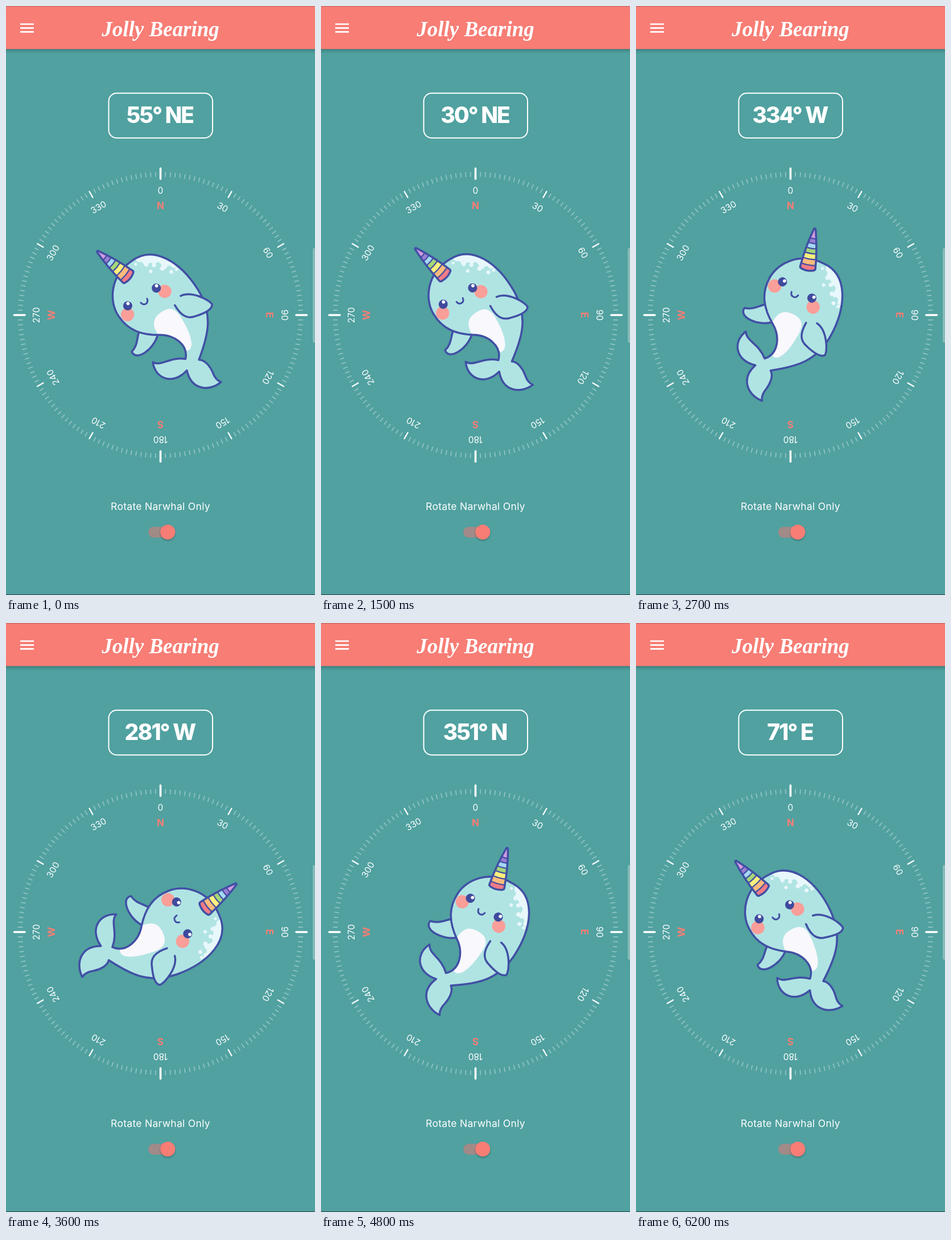
These frames come from a looping animation (543x1032 px, 6.3 s). An HTML page:

```html
<!DOCTYPE html>
<html lang="en">
<head>
<meta charset="utf-8">
<title>Jolly Bearing</title>
<style>
  html, body { margin: 0; width: 100%; height: 100%; overflow: hidden; background: #50a1a0; }
  svg { display: block; width: 543px; height: 1032px; }
  text { font-family: Inter, "Open Sans", sans-serif; fill: #fff; text-anchor: middle; }
  .title { font: italic bold 37px "Liberation Serif", "Noto Serif", serif; }
  .heading { font-size: 39px; font-weight: 800; letter-spacing: -2px; }
  .caption { font-size: 17.5px; letter-spacing: .3px; }
  .degree { font-size: 15.5px; }
  .cardinal { font-size: 17px; font-weight: 700; fill: #f77d75; }
  .line { fill: none; stroke: #414fa4; stroke-width: 3.5; stroke-linecap: round; stroke-linejoin: round; }
  .skin { fill: #b0e4e3; }
  .ink { fill: #3f4a9e; }
  .blush { fill: #f99e98; }
  .frost { fill: #e8f7fb; }
</style>
</head>
<body>
<svg viewBox="0 0 543 1032">
  <defs>
    <linearGradient id="shade" x2="0" y2="1">
      <stop offset="0" stop-color="#1c5555" stop-opacity=".55"/>
      <stop offset=".4" stop-color="#1c5555" stop-opacity=".2"/>
      <stop offset="1" stop-color="#1c5555" stop-opacity="0"/>
    </linearGradient>
    <filter id="lift" x="-30%" y="-30%" width="160%" height="160%">
      <feDropShadow dx="0" dy="1.5" stdDeviation="1.5" flood-opacity=".35"/>
    </filter>
    <path id="body" d="M283 434.5C328 432.5 352 482 351 540C349.5 593 322 617 285 644
      C294 650 295 665 293 676C290 688 293 694 296 698C270 701 244 682 257 648
      C222 657 202 630 215 603C222 618 245 611 266 630C284 612 273 583 250 569
      C225 553 209 533 209 503C208 473 234 434.5 283 434.5Z"/>
    <path id="horn" d="M-1.5 1Q0 -1.5 1.5 1Q10 32 13.5 69Q14 72 11 73Q0 77 -11 73Q-14 72 -13.5 69Q-10 32 -1.5 1Z"/>
    <clipPath id="bodyClip"><use href="#body"/></clipPath>
    <clipPath id="hornClip"><use href="#horn"/></clipPath>
  </defs>

  <rect width="543" height="1032" fill="#50a1a0"/>
  <rect y="75" width="543" height="9" fill="url(#shade)"/>
  <rect width="543" height="75.5" fill="#f77d75"/>
  <rect width="543" height="1" fill="#bd6560"/>
  <rect y="1031" width="543" height="1" fill="#1f3d3d"/>
  <path d="M25 31.8H49M25 38.6H49M25 45.4H49" stroke="#fff" stroke-width="2.6"/>
  <text class="title" x="271.5" y="53">Jolly Bearing</text>
  <rect x="539" y="424" width="8" height="166" rx="3" fill="#85bbb7"/>

  <rect x="180.5" y="152.8" width="182.5" height="78.4" rx="14" fill="none" stroke="#fff" stroke-width="2"/>
  <text class="heading" id="heading" x="270.5" y="205"></text>

  <g id="dial" transform="translate(271.5 541.5)" stroke-linecap="round"></g>

  <g id="narwhal">
    <g class="line">
      <path class="skin" d="M224 545C214 553 209 564 194 567.5C191 587 229 585 248 568L240 550Z"/>
    </g>
    <use href="#body" class="skin"/>
    <g clip-path="url(#bodyClip)">
      <path fill="#f9f8fc" d="M249 572C248 544 260 538 277 538C296 538 301 549 299 572C298 597 291 620 280 620C275 621 270 616 274 605L268 588Z"/>
      <path class="frost" d="M288 430Q287 440 291 444Q295 443 296 449Q294 458 300 458Q304 452 309 457Q309 464 315 461Q321 460 321 468Q319 478 325 479Q330 474 334 480Q334 488 341 486L360 490L340 430Z"/>
      <g class="frost">
        <circle cx="284" cy="443" r="2.5"/><circle cx="299" cy="468" r="3"/>
        <circle cx="310" cy="462" r="3.6"/><circle cx="319" cy="475" r="4"/>
        <circle cx="329" cy="488.5" r="3.4"/><circle cx="339" cy="490" r="3"/>
      </g>
      <circle class="blush" cx="223.5" cy="509" r="11.7"/>
      <circle class="blush" cx="300.5" cy="511" r="11.7"/>
    </g>
    <use href="#body" class="line"/>
    <circle class="ink" cx="232.3" cy="496.3" r="8"/>
    <circle class="ink" cx="291.3" cy="498" r="8"/>
    <circle cx="234.8" cy="493.2" r="2.9" fill="#fff"/>
    <circle cx="293.8" cy="494.8" r="2.9" fill="#fff"/>
    <path class="line" style="stroke-width:3" d="M254.5 504.5C256 513 266 513 267.5 504.5"/>
    <path class="skin" d="M302 541C301 564 308 574 322 577C336 581 352 584 357.5 576C358 566 340 535 319.5 533Z"/>
    <path class="line" d="M302 541C301 564 308 574 322 577C336 581 352 584 357.5 576C358 566 340 535 319.5 533"/>
    <g transform="translate(240 387) rotate(-17)">
      <g id="stripes" clip-path="url(#hornClip)"></g>
      <use href="#horn" class="line"/>
    </g>
  </g>

  <text class="caption" x="271.5" y="883">Rotate Narwhal Only</text>
  <rect x="250" y="912.5" width="46" height="19" rx="9.5" fill="#a18a87"/>
  <circle cx="284.3" cy="921.7" r="13" fill="#f77d75" filter="url(#lift)"/>
</svg>

<script>
const LOOP = 6300, STEP = 100;
const byId = id => document.getElementById(id);

function add(parent, tag, attrs, text = '') {
  const node = document.createElementNS('http://www.w3.org/2000/svg', tag);
  for (const key in attrs) node.setAttribute(key, attrs[key]);
  node.textContent = text;
  parent.append(node);
}

function buildDial() {
  const dial = byId('dial');
  for (let a = 0; a < 360; a += 2) {
    const transform = `rotate(${a})`;
    const major = a % 30 === 0, quarter = a % 90 === 0;
    const [outer, inner, width] = quarter ? [257, 238.5, 3.6] : major ? [250, 238, 2.3] : [250, 243, 1.8];
    add(dial, 'path', {
      d: `M0 ${-outer}V${-inner}`, stroke: '#fff', 'stroke-width': width,
      'stroke-opacity': major ? 1 : .36, transform
    });
    if (major) add(dial, 'text', { class: 'degree', y: -212.7, transform }, a);
    if (quarter) add(dial, 'text', { class: 'cardinal', y: -185.5, transform }, 'NESW'[a / 90]);
  }
}

function buildStripes() {
  const stripes = byId('stripes');
  const colors = ['#d39be0', '#9a7fd0', '#a5d8f5', '#a5d678', '#fdf07c', '#fdba7c', '#f27b86'];
  const edges = [-5, 17, 25.5, 34.5, 43.5, 53.5, 64, 80];
  colors.forEach((fill, i) => add(stripes, 'path', {
    d: `M-20 ${edges[i] - 2}Q0 ${edges[i] + 4} 20 ${edges[i] - 2}V82H-20Z`,
    fill, stroke: '#414fa4', 'stroke-width': 2.3
  }));
}

// Cubic Hermite through [time, value] points, flat at turning points.
function curve(points) {
  const rate = i => (points[i + 1][1] - points[i][1]) / (points[i + 1][0] - points[i][0]);
  const last = points.length - 1;
  const slopes = points.map((_, i) => {
    if (i === 0) return rate(0);
    if (i === last) return rate(last - 1);
    const a = rate(i - 1), b = rate(i);
    return a * b <= 0 ? 0 : 2 * a * b / (a + b);
  });
  return t => {
    let i = 0;
    while (i < last - 1 && t > points[i + 1][0]) i++;
    const [t0, v0] = points[i], [t1, v1] = points[i + 1];
    const h = t1 - t0, u = (t - t0) / h, w = 1 - u;
    return v0 * w * w * (1 + 2 * u) + v1 * u * u * (3 - 2 * u)
      + h * u * w * (slopes[i] * w - slopes[i + 1] * u);
  };
}

const headingAt = curve([[0, 55], [500, 64], [900, 61], [2100, -8], [2700, -26], [3600, -79], [3800, -81], [4800, -9], [6200, 71]]);
const tiltAt = curve([[0, -33.3], [900, -48.4], [2100, 0], [2700, 27.3], [3600, 69.1], [3850, 73], [4800, 32.3], [6200, -26.3]]);

function direction(deg) {
  if (deg >= 337 || deg < 23) return 'N';
  if (deg < 68) return 'NE';
  return deg < 113 ? 'E' : 'W';
}

function draw(now) {
  const t = Math.floor(now % LOOP / STEP) * STEP;
  const deg = (Math.round(headingAt(t)) + 360) % 360;
  byId('heading').textContent = `${deg}° ${direction(deg)}`;
  byId('narwhal').setAttribute('transform', `rotate(${tiltAt(t).toFixed(2)} 271.5 541.5)`);
}

buildDial();
buildStripes();
draw(0);
const start = performance.now();
(function tick() {
  draw(performance.now() - start);
  requestAnimationFrame(tick);
})();
</script>
</body>
</html>
```
